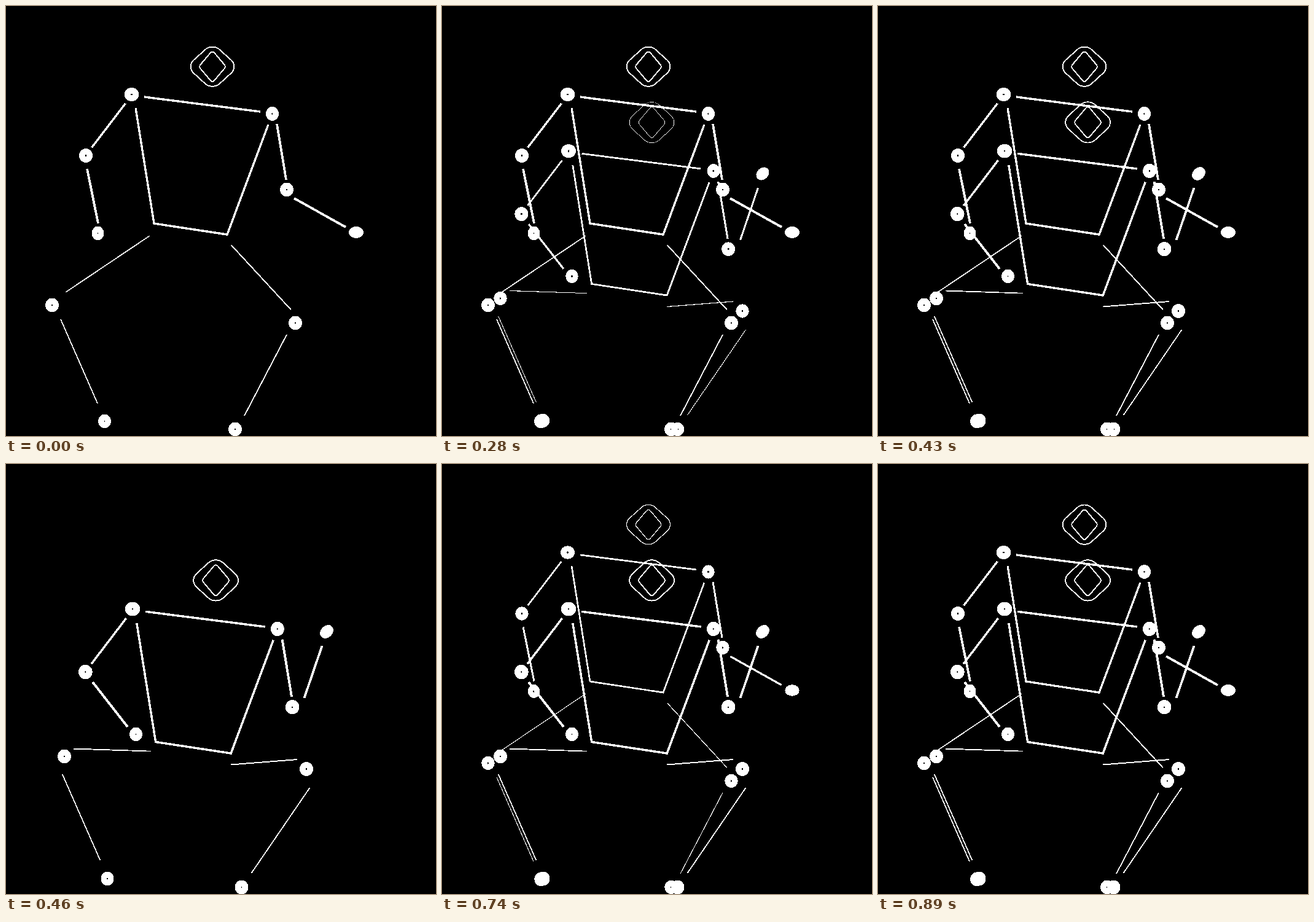
Animation, 700 px wide and 700 px high, one loop 920 ms. Source, as an HTML page:

```html
<!DOCTYPE html>
<html>
<head>
<meta charset="utf-8">
<style>
html, body { margin: 0; height: 100%; overflow: hidden; background: #000; }
/* strong contrast turns partial coverage into hard black or white */
svg { display: block; background: #000; filter: brightness(.98) contrast(200); }
path, rect { fill: none; stroke: #fff; }
.torso { stroke-width: 3.4; }
.arm { stroke-width: 3.8; }
.leg { stroke-width: 1.85; }
.head { stroke-width: 2; vector-effect: non-scaling-stroke; }
.dot { fill: #fff; stroke: none; fill-rule: evenodd; }
</style>
</head>
<body>
<svg width="700" height="700" viewBox="0 0 700 700"></svg>
<script>
const oval = (rx, ry) => `M${-rx} 0a${rx} ${ry} 0 1 0 ${2 * rx} 0a${rx} ${ry} 0 1 0 ${-2 * rx} 0z`;
const line = (kind, d) => `<path class="${kind}" d="${d}"/>`;
const place = (transform, content) => `<g transform="${transform}">${content}</g>`;
const joint = (x, y, rx = 11, ry = 11.4) =>
  place(`translate(${x} ${y})`, line('dot', oval(rx, ry) + oval(rx / 10, ry / 9)));

// a rounded square stood on its corner
const diamond = (side, radius, stretch) =>
  `<rect class="head" x="${-side / 2}" y="${-side / 2}" width="${side}" height="${side}" rx="${radius}"
    transform="scale(${stretch} 1) rotate(45)"/>`;

// head, shoulders, hips and elbows move as one rigid piece
const upperBody =
  place('translate(336 98.7)', diamond(54.2, 15, 1.1) + diamond(37, 4.5, .85)) +
  line('torso', 'M225 148L414 172M211 166L241 354L360 372L427 193M194.5 158.5L139.5 230.5') +
  line('arm', 'M441 192L456 283') +
  joint(204.5, 144, 12, 11) + joint(433.5, 175.5, 10.5) + joint(130, 243.5) + joint(457, 299);

const figure = ({ body, forearms, legs, joints, fist }) => '<g>' +
  place(body, upperBody) + line('arm', forearms) + line('leg', legs) +
  joints.map(p => joint(...p)).join('') + place(fist, line('dot', oval(12, 9.7))) + '</g>';

const raised = {
  body: '',
  forearms: 'M132 265L150 354M469 313L553 360',
  legs: 'M234 374L97 466M366.5 389L464 494.5M89 510L149 647M457 535L388 667',
  joints: [[149.5, 370, 10], [75, 487], [471, 516], [160.5, 676, 10.5], [373, 689]],
  fist: 'translate(570 368.5)'
};
const crouched = {
  body: 'translate(-4.6 87.8) scale(1.03)',
  forearms: 'M141 355L198 428M514.5 296L485.5 381',
  legs: 'M110 463.5L236 467.7M366 489.5L474 481M91.7 505L153.5 645.5M494.5 527L399.5 666',
  joints: [[211.5, 440, 10.5], [95, 476], [489, 496.5], [165, 675, 10.5], [383.5, 689]],
  fist: 'translate(522 273) rotate(-45)'
};

const svg = document.querySelector('svg');
svg.innerHTML = figure(raised) + figure(crouched);
const figures = [...svg.children];

const HALF = 460, HOLD = 70, STEP = 30, STEPS = 14;
const start = performance.now();

// one pose stays solid while the other fades in, then they swap roles
function draw() {
  const t = (performance.now() - start) % (2 * HALF);
  const solid = t < HALF ? 0 : 1;
  const step = Math.max(0, Math.floor((t % HALF - HOLD) / STEP) + 1);
  figures[solid].setAttribute('opacity', 1);
  figures[1 - solid].setAttribute('opacity', step / STEPS);
  requestAnimationFrame(draw);
}
draw();
</script>
</body>
</html>
```
